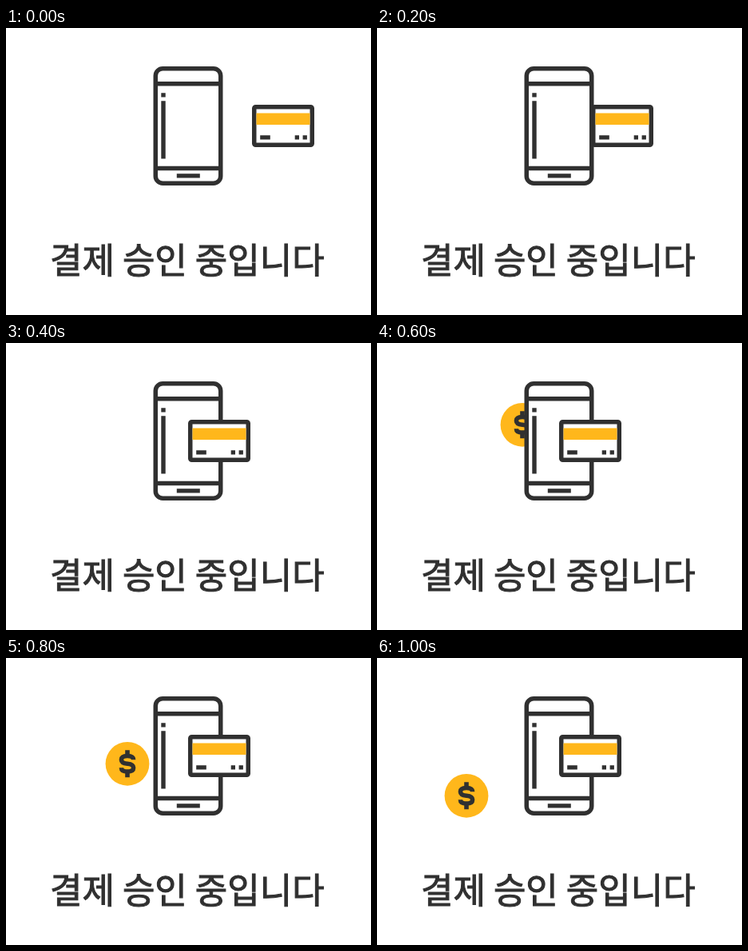
An HTML page that plays this animation: 457 by 359 pixels, repeating every 1100 ms.

```html
<!DOCTYPE html>
<html lang="ko">
<head>
<meta charset="utf-8">
<title>결제 승인</title>
<style>
  html, body { margin: 0; width: 100%; height: 100%; overflow: hidden; background: #fff; }
  svg { display: block; }
  text {
    font: 500 44px "Noto Sans CJK KR", "Noto Sans CJK", "Noto Sans KR", sans-serif;
    word-spacing: -2.4px;
    stroke: #303030;
    stroke-width: 1;
  }
  .outline { fill: #fff; stroke: #303030; stroke-width: 5.5; }
  .line { fill: none; stroke: #303030; stroke-width: 5.5; }
  .accent { fill: #ffb71b; }
</style>
</head>
<body>
<svg width="457" height="359" viewBox="0 0 457 359" fill="#303030">
  <g id="coin">
    <circle class="accent" r="27.4"/>
    <path class="line" d="M7.6-5C7.6-8.4 4.5-9.8 0-9.8S-7.6-8.4-7.6-5S-4-.4 0 0S7.6 1.6 7.6 5S4.5 9.8 0 9.8S-7.6 8.4-7.6 5"/>
    <path d="M-2.8-17h5.6v6h-5.6zM-2.8 11h5.6v6h-5.6z"/>
  </g>

  <g id="phone">
    <rect class="outline" x="187.25" y="50.75" width="81.5" height="143.5" rx="9"/>
    <path class="line" d="M187 69.7H269M187 175.5H269"/>
    <path d="M194.3 81.2h5.4v5.4h-5.4zM194.3 91.3h5.4v72.2h-5.4zM213.8 182.3h29v5.3h-29z"/>
  </g>

  <g id="card">
    <rect class="outline" x="2.75" y="98.75" width="72.5" height="47.5" rx="1.8"/>
    <path class="accent" d="M5.5 106.4h67v14.5h-67z"/>
    <path d="M10.2 134.2h12.6v5.3h-12.6zM53.7 134.2h5.3v5.3h-5.3zM63.6 134.2h5.3v5.3h-5.3z"/>
  </g>

  <text x="55" y="306.7">결제 승인 중입니다</text>
</svg>
<script>
  const LOOP = 1100, STEP = 100;
  const COIN_START = 5;
  const coinTravel = [-15, 0, 15, 30, 60, 70];
  const card = document.getElementById("card");
  const coin = document.getElementById("coin");

  const place = (node, x, y) => node.setAttribute("transform", `translate(${x} ${y})`);

  function render(time) {
    const step = Math.floor((time % LOOP) / STEP);
    place(card, 308 - 20 * Math.min(step, 4), 0);

    // The coin slides out from behind the phone, then drops diagonally.
    const visible = step >= COIN_START;
    coin.style.display = visible ? "" : "none";
    if (visible) {
      const travel = coinTravel[step - COIN_START];
      place(coin, 182 - travel, 102.3 + Math.max(travel, 0));
    }
  }

  const start = performance.now();
  function tick() {
    render(performance.now() - start);
    requestAnimationFrame(tick);
  }
  tick();
</script>
</body>
</html>
```
